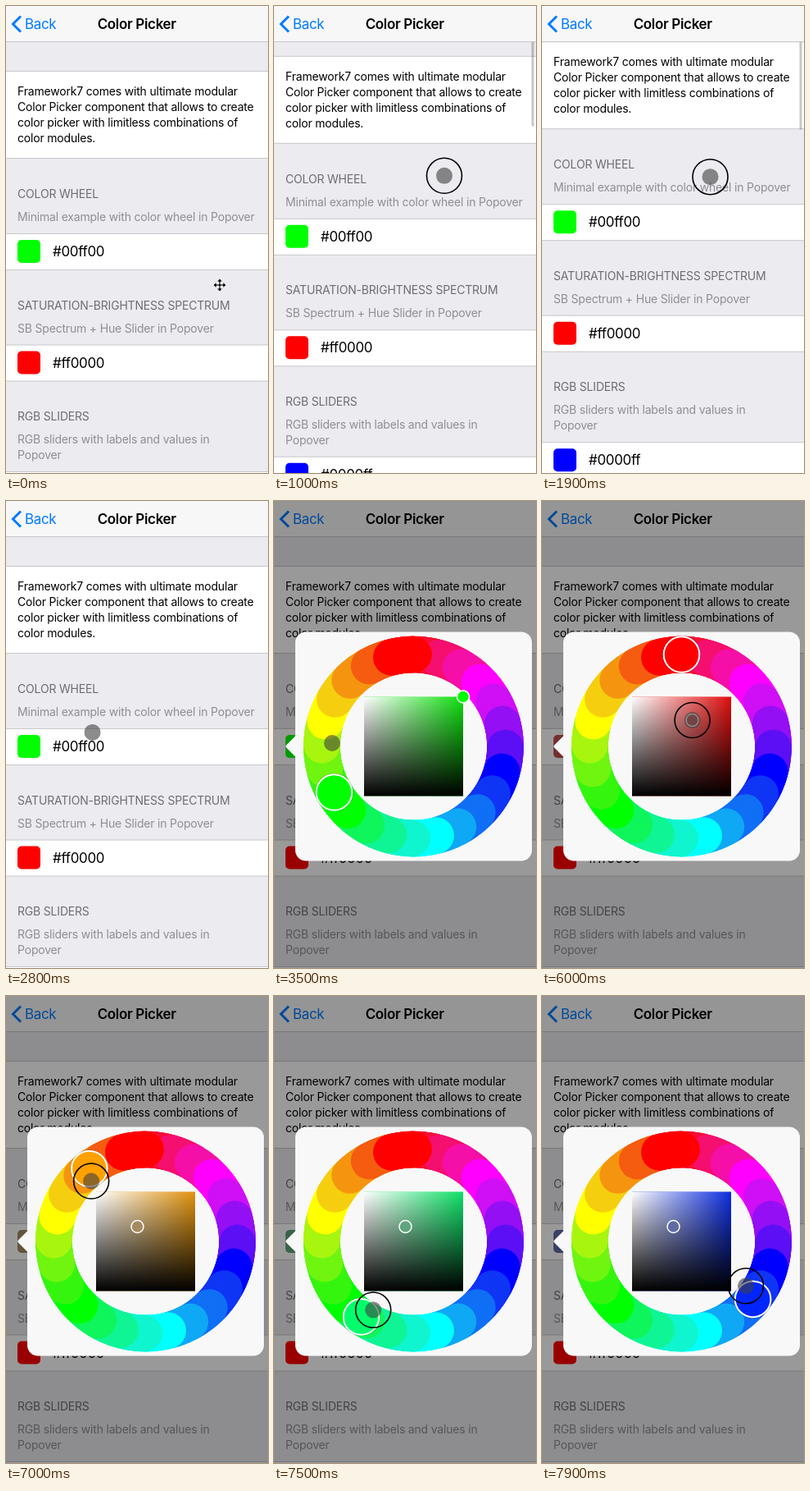
An HTML page that plays this animation: 320x569 px, repeating every 8000 ms.

```html
<!DOCTYPE html>
<html lang="en">
<head>
<meta charset="utf-8">
<title>Color Picker</title>
<style>
  html, body { margin: 0; height: 100%; overflow: hidden; background: #ebebf0; }
  svg { display: block; width: 320px; height: 569px; }
  text { font: 14px Inter, Roboto, sans-serif; letter-spacing: -.19px; }
  .big { font-size: 17px; letter-spacing: -.34px; }
  .title { font-weight: 600; }
  .head { fill: #6d6d72; }
  .sub { fill: #8e8e93; }
  .line { stroke: #c8c7cc; }
</style>
</head>
<body>
<svg viewBox="0 0 320 569">
  <defs>
    <linearGradient id="white"><stop stop-color="#fff"/><stop offset="1" stop-color="#fff" stop-opacity="0"/></linearGradient>
    <linearGradient id="black" x2="0" y2="1"><stop stop-opacity="0"/><stop offset="1"/></linearGradient>
  </defs>
  <rect width="320" height="569" fill="#ebebf0"/>
  <g id="page"></g>
  <rect id="bar" x="314.500" y="20" width="3" height="123" rx="1.500" fill-opacity=".22"/>
  <rect width="320" height="44" fill="#f7f7f8"/>
  <path class="line" d="M0 43.500H320"/>
  <path d="M18 12.500L8.500 22L18 31.500" fill="none" stroke="#007aff" stroke-width="3"/>
  <text class="big" x="23" y="28" fill="#007aff">Back</text>
  <text class="big title" x="159.700" y="28" text-anchor="middle">Color Picker</text>
  <g id="popover">
    <rect width="320" height="569" fill-opacity=".4"/>
    <rect x="26" y="159.500" width="289" height="279" rx="13" fill="#f8f8f8"/>
    <path d="M26.500 286L15 297.500q-1.500 1.500 0 3L26.500 312z" fill="#f8f8f8"/>
    <g id="wheel"></g>
    <g transform="translate(110 238.500)">
      <rect id="base" width="121" height="121"/>
      <rect width="121" height="121" fill="url(#white)"/>
      <rect width="121" height="121" fill="url(#black)"/>
    </g>
    <circle id="shade" r="7.500" stroke="#fff" stroke-width="1.500"/>
    <g id="knob">
      <circle r="23.300" fill-opacity=".25"/>
      <circle id="knobFill" r="21.800" stroke="#fff" stroke-width="2"/>
    </g>
  </g>
  <g id="touch">
    <circle r="10" fill="#404040" fill-opacity=".6"/>
    <circle id="ring" r="21.500" fill="none" stroke="#000" stroke-width="1.600"/>
  </g>
  <path id="arrows" transform="translate(261 340)" stroke="#fff" stroke-width=".8"
    d="M0-8L3.500-4H1V-1H4V-3.500L8 0L4 3.500V1H1V4H3.500L0 8L-3.500 4H-1V1H-4V3.500L-8 0L-4-3.500V-1H-1V-4H-3.500z"/>
</svg>
<script>
const $ = id => document.getElementById(id);
const LOOP = 8000, CX = 170.5, CY = 299, TRACK = 112;
const LEFT = 110, TOP = 238.5, SIDE = 121;

// Page content
const text = (cls, x, y, lines) =>
  lines.map((s, i) => `<text class="${cls}" x="${x}" y="${y + i * 19}">${s}</text>`).join('');
const panel = (y, h) => `<rect y="${y}" width="320" height="${h}" fill="#fff"/>
  <path class="line" d="M0 ${y}H320M0 ${y + h}H320"/>`;
function section([color, head, ...subs], i) {
  const y = 229 + i * 135.5, mid = y + 51 + subs.length * 19;
  return text('head', 14, y + 5, [head]) + text('sub', 14, y + 33, subs) +
    panel(mid - 21.5, 44) +
    `<rect x="14" y="${mid - 14}" width="28" height="28" rx="5" fill="${color}"/>` +
    text('big', 57, mid + 6, [color]);
}
$('page').innerHTML = panel(79.5, 106) + text('', 14, 109, [
  'Framework7 comes with ultimate modular',
  'Color Picker component that allows to create',
  'color picker with limitless combinations of',
  'color modules.'
]) + [
  ['#00ff00', 'COLOR WHEEL', 'Minimal example with color wheel in Popover'],
  ['#ff0000', 'SATURATION-BRIGHTNESS SPECTRUM', 'SB Spectrum + Hue Slider in Popover'],
  ['#0000ff', 'RGB SLIDERS', 'RGB sliders with labels and values in', 'Popover']
].map(section).join('');
const swatch = $('page').querySelector('[rx]');

// Hue wheel: overlapping discs in bands of 15 degrees, pure at every 60
function polar(hue, r) {
  const a = hue * Math.PI / 180;
  return [CX - r * Math.sin(a), CY - r * Math.cos(a)];
}
let discs = '';
for (let a = 358; a >= 0; a--) {
  const [x, y] = polar(a, TRACK), band = a - a % 15;
  const color = band % 60 ? `hsl(${band + 5} 92% 51%)` : `hsl(${band} 100% 50%)`;
  discs += `<circle cx="${x}" cy="${y}" r="22.4" fill="${color}"/>`;
}
$('wheel').innerHTML = discs;

// Motion
const part = (t, from, to) => Math.min(1, Math.max(0, (t - from) / (to - from)));
const ramp = (t, from, to, a, b) => a + (b - a) * part(t, from, to);
const ease = p => p * p * (3 - 2 * p);

const scrollAt = t => 90 * (part(t, 900, 1400) - part(t, 1550, 2133));
const angleAt = t => t < 6000 ? ramp(t, 4000, 5020, 120, 360) : ramp(t, 6805, LOOP, 0, 256.6);

// Glides of the finger: start, end, x, y
const glides = [[100, 750, 208, 225], [1400, 1550, 205.5, 244], [2400, 3000, 71, 295],
  [3550, 3950, 78, 352], [5000, 5020, 170.5, 192], [5150, 5450, 231, 238.5],
  [5600, 6250, 160.5, 281], [6350, 6750, 170.5, 199]];
const presses = [[850, 1400], [1550, 2250], [3200, 3350], [4000, 5150], [5500, 6300], [6750, LOOP]];

const glideAt = t => glides.reduce(([x, y], [from, to, x2, y2]) => {
  const p = ease(part(t, from, to));
  return [x + (x2 - x) * p, y + (y2 - y) * p];
}, [261, 340]);

function fingerAt(t) {
  if (t >= 3950 && t < 5150 || t >= 6750) return polar(angleAt(t), ramp(t, 5000, LOOP, 107, 95));
  const [x, y] = glideAt(t);
  return [x, y - scrollAt(t)];
}

const place = (id, [x, y]) => $(id).setAttribute('transform', `translate(${x} ${y})`);
const show = (id, amount) => $(id).setAttribute('opacity', +amount);
const fill = (id, color) => $(id).setAttribute('fill', color);

function hsv(h, s, v) {
  const l = v * (1 - s / 2), m = Math.min(l, 1 - l);
  return `hsl(${h} ${m ? (v - l) / m * 100 : 0}% ${l * 100}%)`;
}

function draw(now) {
  const t = now % LOOP, scroll = scrollAt(t);
  place('page', [0, -scroll]);
  place('bar', [0, scroll * .21]);
  show('bar', part(t, 920, 980) - part(t, 2500, 2800));
  show('popover', part(t, 3330, 3480));

  const hue = angleAt(t - 20) % 360;
  const spot = glideAt(Math.min(Math.max(t, 5600), 6250));
  const color = hsv(hue, (spot[0] - LEFT) / SIDE, 1 - (spot[1] - TOP) / SIDE);
  place('knob', polar(hue, TRACK));
  place('shade', spot);
  fill('knobFill', `hsl(${hue} 100% 50%)`);
  fill('base', `hsl(${hue} 88% 47%)`);
  fill('shade', color);
  swatch.setAttribute('fill', color);

  place('touch', fingerAt(t));
  show('touch', t >= 100);
  show('arrows', t < 100);
  show('ring', presses.some(([from, to]) => t >= from && t < to));
  requestAnimationFrame(draw);
}
requestAnimationFrame(draw);
</script>
</body>
</html>
```
